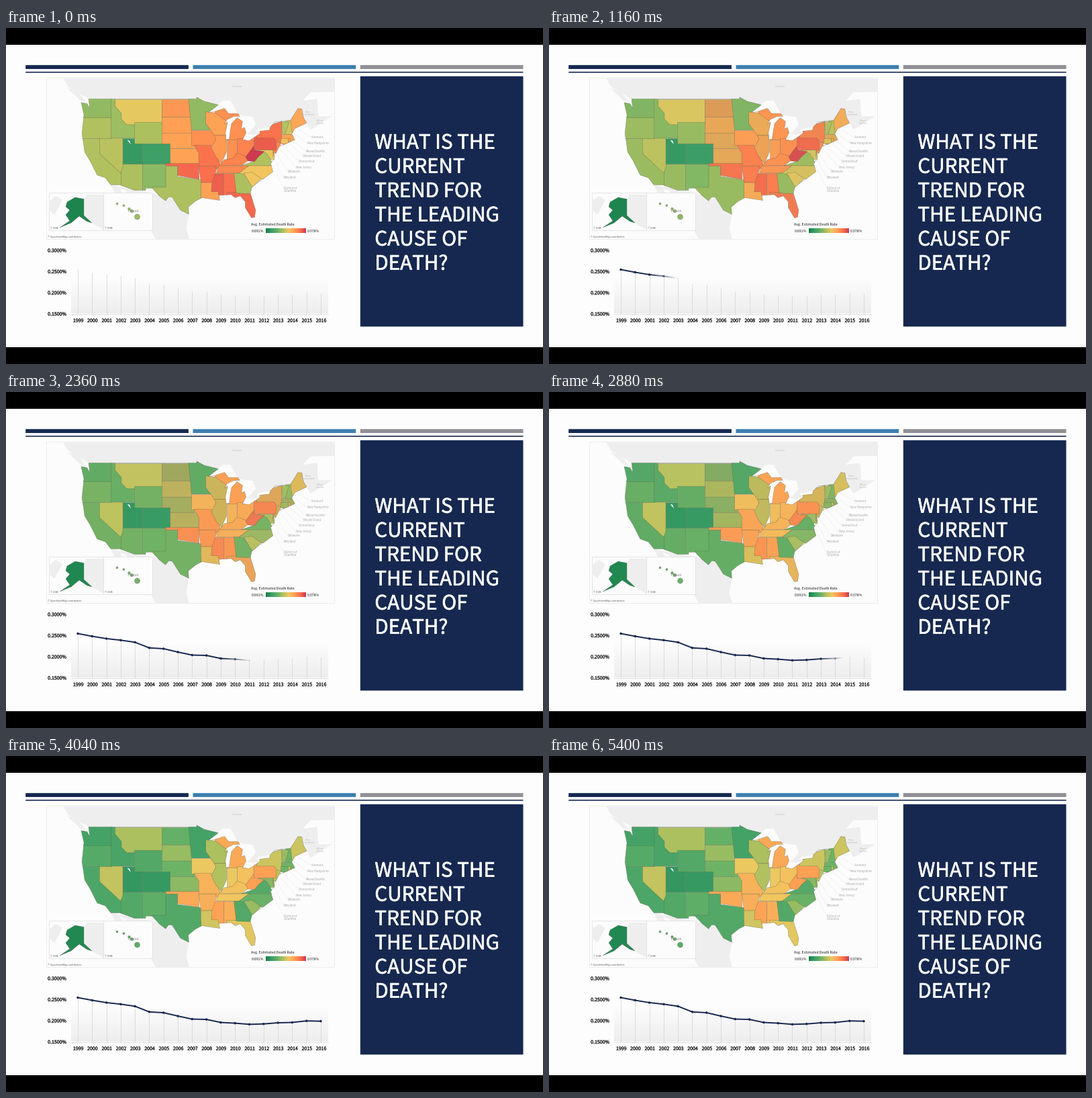
A matplotlib script for the animation above (5.44 s loop, 800 by 500 pixels).

```python
import numpy as np
import matplotlib.pyplot as plt
from matplotlib.animation import FuncAnimation
from matplotlib.collections import LineCollection, PolyCollection
from matplotlib.patches import Polygon, Rectangle
from matplotlib.patheffects import withStroke

W, H, DPI = 800, 500, 100
FRAMES, STEP = 136, 40
PX = 72 / DPI
NAVY, BLUE, GREY = "#16284f", "#3d7fb0", "#8f8f95"
PAPER, SEA, LAND = "#fdfdfd", "#fcfcfc", "#eeeeee"
EDGE = (.35, .36, .28, .55)

fig = plt.figure(figsize=(W / DPI, H / DPI), dpi=DPI, facecolor="black")
ax = fig.add_axes([0, 0, 1, 1])
ax.axis("off")


def rect(x0, y0, x1, y1, color, z=1, **kw):
    return ax.add_patch(Rectangle((x0, y0), x1 - x0, y1 - y0, fc=color, zorder=z, **kw))


def label(x, y, text, size, color="#1c1c1c", ha="left", bold=0):
    effects = [withStroke(linewidth=bold * PX, foreground=color)] if bold else None
    ax.text(x, y, text, size=size * PX, color=color, ha=ha, va="baseline",
            family="Noto Sans CJK JP", zorder=8, path_effects=effects)


def gradient(rgb, x0, y0, x1, y1, z):
    ax.imshow(rgb, extent=(x0, x1, y1, y0), aspect="auto", zorder=z)


def proj(*c):
    """West longitude / latitude pairs to stage pixels (Mercator)."""
    lon, lat = np.array(c[::2]), np.radians(c[1::2])
    merc = np.log(np.tan(np.pi / 4 + lat / 2))
    return np.column_stack([112 + (124.7 - lon) * 5.82, 105.6 + (0.9838 - merc) * 333.5])


# Slide
rect(0, 25, W, 475, PAPER)
for i, color in enumerate((NAVY, BLUE, GREY)):
    rect(29.2 + 249.3 * i, 55.2, 271.9 + 249.3 * i, 61, color, snap=False)
rect(29.2, 65, 770.5, 66.6, NAVY, snap=False)
rect(527.8, 71.8, 770.5, 444.3, NAVY, snap=False)
title = ("WHAT IS THE", "CURRENT", "TREND FOR", "THE LEADING", "CAUSE OF", "DEATH?")
for i, line in enumerate(title):
    label(549.3, 179.7 + 36 * i, line, 29.6, "#fafafa", bold=0.6)

# Base map
frame = rect(59.5, 73.5, 488.5, 314, SEA, ec="#e6e6e6", lw=0.5)


def ground(color, *c):
    ax.add_patch(Polygon(proj(*c), fc=color, zorder=2)).set_clip_path(frame)


ground(LAND, 131, 54, 128, 51, 122.8, 49, 100, 45, 76, 42, 67, 44.8, 66, 43.6, 60.5, 46,
       64, 46, 64.3, 49, 68, 48.7, 66, 50.1, 59, 50.2, 58, 54)
ground(LAND, 128.2, 50.8, 125.5, 50.2, 123.4, 48.4, 125, 48.8)
ground(LAND, 117.1, 32.5, 97.15, 29, 97.15, 25.95, 97.8, 22.5, 97, 20, 105.5, 20, 109, 25.5,
       113.2, 31.2, 114.8, 31.7, 109.5, 23, 112, 24.6, 116, 30.5)
ground(SEA, 92.1, 46.7, 88.5, 48.7, 86.5, 48.7, 84.6, 46.5, 88.4, 46.5)
ground(SEA, 87.9, 41.6, 83, 42.6, 81.5, 43.2, 80, 44.5, 80.7, 45.9, 84, 46.2, 88.2, 45.5)
ground(SEA, 83.6, 41.4, 81, 41.2, 78.9, 42.9, 82, 42.4)
ground(SEA, 79.8, 43.3, 76.5, 43.2, 76.3, 44.1, 79.4, 43.7)

# Outline of the mainland, walked coast by coast
pacific = (123.2, 48.2, 124.7, 48.4, 124, 46.3, 124.5, 42.8, 124.1, 41, 123.8, 39.3,
           122.4, 37.5, 120.6, 34.6, 118.5, 34, 117.1, 32.5)
south = (114.8, 32.5, 111.07, 31.33, 108.2, 31.33, 108.2, 31.8, 106.5, 31.8, 104.7, 30.1,
         103.1, 29, 102.3, 29.9, 101.4, 29.8, 99.3, 26.9, 97.15, 25.95)
gulf = (97.3, 27.6, 95.5, 28.9, 93.8, 29.7, 91.5, 29.4, 89.2, 29.1, 89.5, 30.2, 86.3, 30.4,
        85.3, 29.7, 84, 30.1, 82.7, 28.8, 82.7, 27.5, 81.1, 25.1, 80.3, 25.3)
atlantic = (80.05, 26.9, 81.4, 30.7, 81, 32, 79.2, 33.2, 77.9, 33.9, 75.6, 35.3, 76.2, 37,
            75.2, 38, 75.4, 39.3, 74.9, 39, 74, 40.4, 72, 41, 70, 41.7, 70.8, 42.8,
            70, 43.8, 67, 44.8)
north_east = (67.8, 45.8, 68.2, 47.3, 69.2, 47.4, 71.1, 45.3, 75, 45, 76.3, 44.1,
              76.5, 43.5, 79, 43.3, 78.9, 42.9, 81.7, 41.5, 83.4, 41.7, 82.5, 43)
lakes = (82.9, 44, 83.7, 43.7, 83.4, 45.1, 84.8, 45.75, 86.2, 44.7, 86.5, 43.5, 86.8, 41.8,
         87.6, 41.7, 87.8, 43, 87.2, 45, 88, 44.6, 87.4, 45.4, 85.6, 46, 84.1, 46, 84.6, 46.5,
         87, 46.5, 88, 47.4, 90.8, 46.8, 92.1, 46.7, 89.6, 48, 93.2, 48.6, 95.15, 49.3,
         95.15, 49, 122.8, 49, 122.5, 47.4)
coast = np.concatenate([proj(*c) for c in (pacific, south, gulf, atlantic, north_east, lakes)])
nation = ax.add_patch(Polygon(coast, fill=False, ec=EDGE, lw=0.4, zorder=4.1))

# States overlap like cut paper: later ones cover earlier ones
cells = []


def cell(rate, *c, drop=.2):
    cells.append((rate, rate - drop, proj(*c)))


def box(rate, w, e, n, s, drop=.2):
    cell(rate, w, n, e, n, e, s, w, s, drop=drop)


box(.43, 125, 114, 42, 32, drop=.23)          # CA
box(.42, 114.5, 109.05, 37, 31.2)             # AZ
cell(.45, 120, 42, 114.04, 42, 114.04, 36.2, 114.6, 35, 120, 39, drop=-.02)  # NV
box(.43, 125, 116.9, 46.1, 42)                # OR
box(.37, 125, 117.03, 49.4, 45.8)             # WA
box(.55, 116.05, 104.05, 49, 44.5, drop=.13)  # MT
box(.12, 114.04, 109.05, 42, 37, drop=.01)    # UT
cell(.39, 117.03, 49, 116.05, 49, 116.05, 47.8, 114.4, 46.5, 114.4, 45.5, 113, 44.5,
     111.05, 44.5, 111.05, 42, 117.03, 42)    # ID
box(.42, 111.05, 104.05, 45, 41)              # WY
box(.36, 109.05, 103.05, 37, 31.3, drop=.1)   # NM
cell(.42, 106.6, 32, 103.05, 32, 103.05, 36.5, 100, 36.5, 100, 34.3, 94.04, 33.6,
     94.04, 31, 93.8, 29.5, 93.8, 25, 106.6, 25)  # TX
box(.74, 104.05, 96.7, 49, 45.94, drop=.46)   # ND
box(.71, 104.05, 96.45, 45.94, 42.7, drop=.33)  # SD
box(.7, 104.05, 95.6, 43, 40, drop=.4)        # NE
box(.7, 102.05, 94.6, 40, 37, drop=.34)       # KS
box(.15, 109.05, 102.05, 41, 37, drop=.03)    # CO
cell(.88, 103.05, 37, 94.6, 37, 94.5, 33.7, 100, 34.5, 100, 36.5, 103.05, 36.5)  # OK
box(.76, 90.5, 82, 47.6, 41.75, drop=.08)     # MI
cell(.37, 97.2, 49, 95, 49.5, 89, 48.1, 92.1, 46.7, 92.8, 45.6, 92.8, 44.7, 91.2, 43.5,
     96.45, 43.5)                             # MN
box(.76, 96.5, 90.3, 43.5, 40.6)              # IA
box(.9, 91.6, 88.3, 35, 30)                   # MS
box(.86, 88.3, 85, 35, 30)                    # AL
box(.88, 87.6, 79.5, 31, 24.5, drop=.34)      # FL
cell(.86, 94.6, 36.5, 89.7, 36.5, 91.2, 33, 94.04, 33)  # AR
cell(.85, 95.8, 40.6, 91.5, 40.6, 90, 38.6, 89.1, 36.9, 89.6, 36, 90.3, 36, 90.1, 36.5,
     94.6, 36.5, 94.6, 39.1)                  # MO
cell(.7, 94.04, 33, 91.2, 33, 91.4, 31, 89.7, 31, 89, 29, 94, 29)  # LA
cell(.7, 92.8, 46.8, 90.4, 46.6, 87.8, 45.3, 87, 45, 87.5, 42.5, 90.6, 42.5, 92.8, 44.7,
     drop=.28)                                # WI
box(.76, 87.5, 84.8, 41.75, 37.9)             # IN
box(.8, 84.8, 80.5, 42, 38.4)                 # OH
cell(.8, 89.4, 36.5, 83.6, 36.6, 82, 37.6, 82.6, 38.5, 84.8, 39.1, 86, 38, 88, 37.8)  # KY
cell(.73, 90.6, 42.5, 87.5, 42.5, 87.5, 39.3, 88.8, 37, 90.2, 38.3, 91.4, 40.2, 90.2, 41.8,
     drop=.3)                                 # IL
cell(.78, 90.1, 35, 84.3, 35, 81.7, 36.55, 89.5, 36.5)  # TN
cell(.42, 85.6, 35, 83.1, 35, 80.8, 32, 81.3, 30.6, 85, 30.7)  # GA
cell(.59, 84.3, 35, 81.7, 36.55, 75.4, 36.55, 75.4, 33.5, 78.6, 33.8, drop=.3)  # NC
cell(.58, 83.1, 35, 81, 35.2, 78.6, 33.85, 80.9, 32)  # SC
box(.55, 79.5, 75, 39.72, 37.9)               # MD
box(.6, 75.75, 75, 39.8, 38.45)               # DE
cell(.43, 83.7, 36.55, 75.5, 36.55, 76.3, 37.9, 77.2, 39, 78.3, 39.4, 80.3, 37.5)  # VA
cell(1, 82.6, 38.3, 80.5, 40.5, 80.4, 39.7, 77.8, 39.4, 79.3, 38.4, 80.3, 37.4, 82, 37.5,
     drop=.29)                                # WV
box(.8, 75.5, 73.9, 41.4, 38.9, drop=.35)     # NJ
box(.91, 80.5, 74.9, 42.3, 39.72)             # PA
cell(.85, 79.8, 42, 79.8, 43.5, 76, 44.5, 73.35, 45.1, 73.4, 42, 72, 41.2, 72, 40.5,
     74.7, 41.4, 75.35, 42, drop=.36)         # NY
box(.5, 72.5, 70.7, 45.3, 42.7)               # NH
cell(.44, 73.35, 45, 71.5, 45, 72.5, 42.73, 73.25, 42.73, drop=.06)  # VT
cell(.69, 71.1, 45.3, 69.5, 47.6, 67, 47.6, 66.8, 44.5, 70.7, 43)  # ME
box(.7, 73.5, 69.9, 42.73, 41.4, drop=.4)     # MA
box(.6, 73.6, 71.8, 42.02, 40.95, drop=.3)    # CT
box(.7, 71.8, 71.2, 42.02, 41.3)              # RI

# Palette from low to high rate
stops = ["#188049", "#3c9e67", "#66b167", "#b0c15f", "#f0c960", "#ff9f54", "#fb714c", "#ce3a50"]
stops = np.array([plt.matplotlib.colors.to_rgb(s) for s in stops])


def tint(v):
    at = np.linspace(0, 1, len(stops))
    return np.column_stack([np.interp(v, at, ch) for ch in stops.T])


def add_tiles(group, clip=None):
    first, last, outlines = zip(*group)
    tiles = PolyCollection(outlines, edgecolors=[EDGE], linewidths=0.4, zorder=4)
    ax.add_collection(tiles)
    if clip is not None:
        tiles.set_clip_path(clip)
    return tiles, tint(first), tint(last)


# Insets
for x0, x1 in ((64, 145), (145, 218)):
    rect(x0, 245, x1, 301, SEA, 3, ec="#dddddd", lw=0.5)
    label(x0 + 2, 299, "© OSM", 3.6, "#555555")
for shore in ([(116, 254), (120, 248), (145, 248), (145, 300), (128, 290), (116, 280)],
              [(64, 258), (74, 250), (84, 256), (72, 278), (64, 270)]):
    ax.add_patch(Polygon(shore, fc=LAND, zorder=3.1))

alaska = [(89, 266), (91, 259), (103, 252), (116, 254.5), (116, 279), (128, 290), (121, 288),
          (109, 280), (97, 290), (80, 297), (95, 287), (89, 278), (95, 271)]
insets = [(.02, .04, alaska)]
turn = np.linspace(0, 2 * np.pi, 9)[:-1]
for u in (0, .33, .6, .73, 1):
    x, y, r = 165.5 + 30 * u, 261.5 + 19.5 * u ** 1.8, 1.6 + 2.6 * u ** 4
    insets.append((.39, .25, np.column_stack([x + r * np.cos(turn), y + r * np.sin(turn)])))
label(181, 274, "Hawaii", 5.2, "#8a8a8a")

layers = [add_tiles(cells, nation), add_tiles(insets)]
ax.add_patch(Polygon(proj(112.9, 41.6, 112.3, 41.5, 112, 40.8), fc="white", zorder=5))

# Map labels, the eastern ones on leader lines
names = (("Vermont", 455, 164.5), ("New Hampshire", 449, 173), ("Massachusetts", 447, 185.3),
         ("Rhode Island", 443, 191.7), ("Connecticut", 436, 199.5), ("New Jersey", 432, 208.7),
         ("Delaware", 420, 214.7), ("Maryland", 414, 223.7), ("District of", 414, 239.5))
for u, (text, x, y) in zip(np.linspace(0, 1, len(names)), names):
    ax.plot([420 - 30 * u, x - 1], [141 + 49 * u, y - 2], color="#ececec", lw=0.4, zorder=3)
    label(x, y, text, 4.3, "#aaaaaa")
label(414, 244, "Columbia", 4.3, "#aaaaaa")
for x, y, text in ((344, 88.5, "Ontario"), (450, 126, "New\nBrunswick"), (468, 139, "Nova\nScotia")):
    for row, word in enumerate(text.split("\n")):
        label(x, y + 4 * row, word, 4.2, "#bcbcbc", "center")
label(62, 312, "© OpenStreetMap contributors", 3.5, "#555555")

# Legend
rect(362, 287, 470, 308, SEA, 3)
label(365, 294, "Avg. Estimated Death Rate", 5.3)
label(366, 303.6, "0.091%", 5.4)
label(448.5, 303.6, "0.378%", 5.4)
gradient(tint(np.linspace(0, 1, 60))[None], 387, 298, 446.5, 305, 6)

# Trend chart
gradient(np.linspace(.99, .93, 40)[:, None, None] * np.ones(3), 97, 375, 480, 425.5, 2)
ax.set(xlim=(0, W), ylim=(H, 0))
ax.plot([97, 480], [425.5, 425.5], color="#d8d8d8", lw=0.6, zorder=3)
for i in range(4):
    label(90.3, 333.5 + 31.5 * i, f"{0.3 - 0.05 * i:.4f}%", 7, ha="right", bold=0.2)

xs = 107 + 21.29 * np.arange(18)
ys = np.array([359.5, 363.5, 367, 369.3, 372.4, 380.8, 382, 387, 391.5, 392, 396.5,
               397.6, 399.3, 398.7, 397, 396.5, 394.2, 394.6])
for i, (x, y) in enumerate(zip(xs, ys)):
    ax.plot([x, x], [y, 425.5], color="#d3d3d3", lw=0.55, zorder=3)
    label(x + 0.7, 437.7, str(1999 + i), 7, ha="center", bold=0.2)

ink = np.array([22, 39, 79]) / 255
SOFT = 40
solid, = ax.plot([], [], color=ink, lw=1.4, zorder=6, solid_capstyle="butt")
tail = LineCollection([], linewidths=1.4, zorder=6, capstyle="butt")
ax.add_collection(tail)
dots = ax.scatter(xs, ys, s=(3.5 * PX) ** 2, linewidths=0, zorder=7)


def update(n):
    # One clock drives the colour cross-fade and the soft-edged wipe
    p = np.clip((n * STEP - 500) / 3000, 0, 1)
    for tiles, first, last in layers:
        tiles.set_facecolor(first + (last - first) * p)

    front = 97 + (391 + SOFT) * p

    def inked(x):
        alpha = np.clip((front - x) / SOFT, 0, 1)
        return np.column_stack([np.tile(ink, (len(x), 1)), alpha])

    full, end = np.clip([front - SOFT, front], xs[0], xs[-1])
    lx = np.append(xs[xs < full], full)
    solid.set_data(lx, np.interp(lx, xs, ys))
    cuts = np.linspace(full, end, 21)
    pts = np.column_stack([cuts, np.interp(cuts, xs, ys)])
    tail.set_segments(np.stack([pts[:-1], pts[1:]], axis=1) if end > full else [])
    tail.set_color(inked((cuts[:-1] + cuts[1:]) / 2))
    dots.set_facecolor(inked(xs))
    return [tiles for tiles, *_ in layers] + [solid, tail, dots]


anim = FuncAnimation(fig, update, frames=FRAMES, interval=STEP, repeat=True, repeat_delay=0)
plt.show()
```
